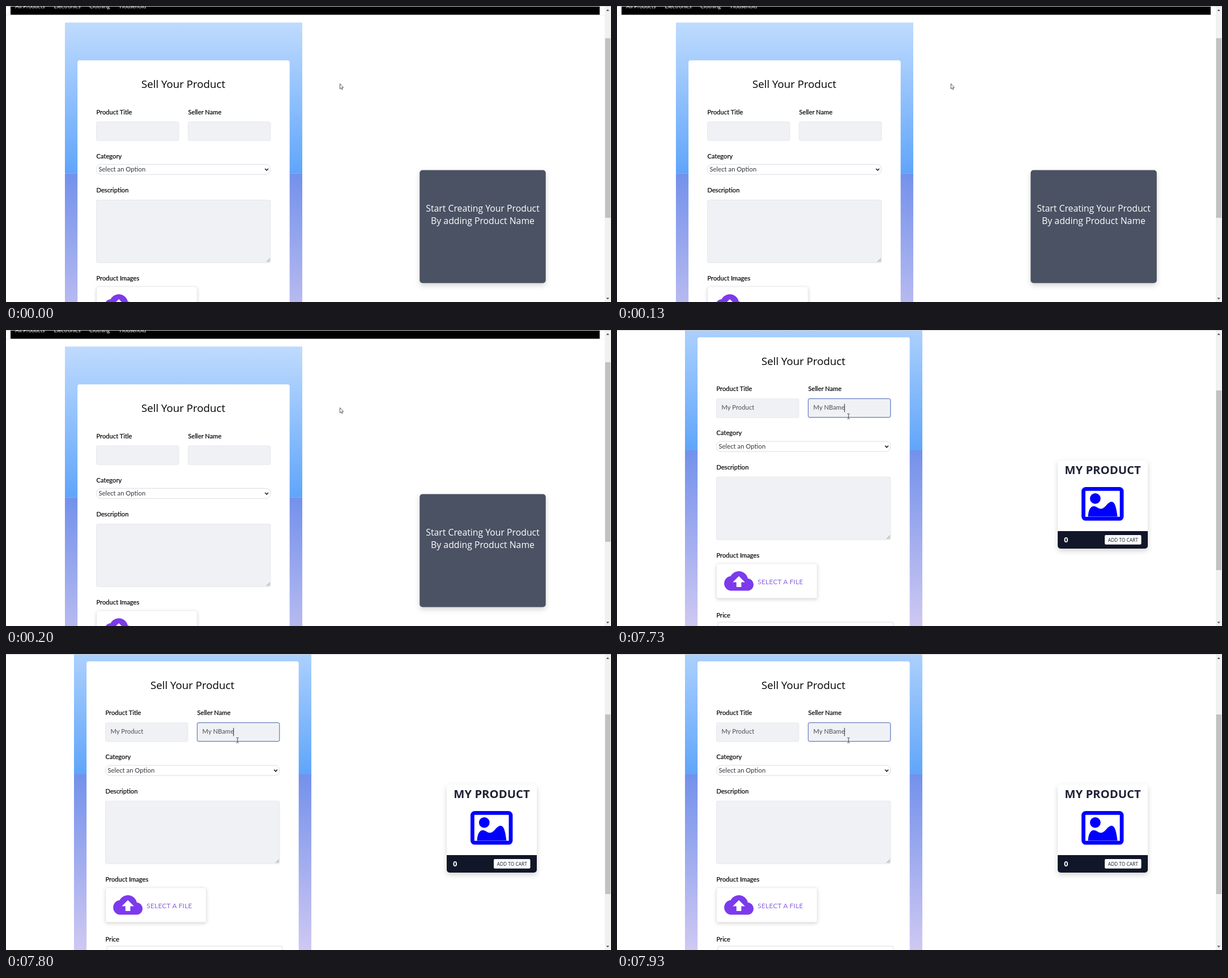
These frames come from a looping animation (1068 by 524 pixels, 8000 ms). An HTML page:

```html
<!DOCTYPE html>
<html lang="en">
<head>
<meta charset="utf-8">
<title>Sell form</title>
<style>
  html, body { margin: 0; width: 100%; height: 100%; overflow: hidden; background: #fff; }
  svg { display: block; width: 1068px; height: 524px; font-family: Lato, "Open Sans", sans-serif; }
  .ui { font-family: "Open Sans", "Noto Sans", sans-serif; }
  .label { font-size: 11.2px; stroke: #000; stroke-width: .2px; }
  .value { font-size: 11.3px; fill: #4d5058; }
  .field { fill: #f0f1f5; stroke: #e7e8ed; }
  .nav { font-size: 9.9px; fill: #fff; }
  .soft { filter: drop-shadow(0 2px 3px rgba(0, 0, 0, .16)); }
  .card { filter: drop-shadow(0 4px 5px rgba(0, 0, 0, .17)); }

  /* The page jumps from the empty form to the filled one at 7730 ms. */
  .before, .after, .form, .thumb { animation: 8s step-end infinite; }
  .before { animation-name: leave; }
  .after { animation-name: enter; }
  .form { animation-name: scroll; }
  .thumb { animation-name: slide; }
  @keyframes leave { 0% { visibility: visible; } 96.625%, 100% { visibility: hidden; } }
  @keyframes enter { 0% { visibility: hidden; } 96.625%, 100% { visibility: visible; } }
  @keyframes scroll { 0% { transform: none; } 96.625%, 100% { transform: translate(16px, -83.2px); } }
  @keyframes slide { 0% { transform: none; } 96.625%, 100% { transform: translateY(50px); } }
</style>
</head>
<body>
<svg viewBox="0 0 1068 524">
  <defs>
    <linearGradient id="sky" x2="0" y2="1">
      <stop stop-color="#bfdbfe"/><stop offset="1" stop-color="#60a5fa"/>
    </linearGradient>
    <linearGradient id="dusk" x2="0" y2="1">
      <stop stop-color="#7391eb"/><stop offset="1" stop-color="#d0c9f2"/>
    </linearGradient>
  </defs>

  <g class="form">
    <path fill="url(#sky)" d="M104 29.3h419v267h-419z"/>
    <path fill="url(#dusk)" d="M104 296.2h419v315h-419z"/>
    <rect x="126.2" y="96.2" width="374.5" height="540" rx="3.5" fill="#fff"/>
    <text class="ui" x="313" y="145.3" font-size="18.7" text-anchor="middle">Sell Your Product</text>

    <g class="label">
      <text x="159.5" y="191.7">Product Title</text>
      <text x="321.5" y="191.7">Seller Name</text>
      <text x="159.5" y="269.7">Category</text>
      <text x="159.5" y="330.2">Description</text>
      <text x="159.5" y="486">Product Images</text>
      <text x="159.5" y="592.7">Price</text>
    </g>

    <g class="field">
      <rect x="159.5" y="205" width="145.5" height="33.3" rx="2.5"/>
      <rect x="321.5" y="205" width="145.5" height="33.3" rx="2.5"/>
      <rect x="159.5" y="343.4" width="307.5" height="111" rx="2.5"/>
    </g>
    <path d="M460 453l6-6M463.3 453l2.7-2.7" stroke="#777" stroke-width=".9"/>

    <rect x="159.7" y="280.3" width="307" height="18" rx="8" fill="#fff" stroke="#d9dce3"/>
    <text x="163.5" y="293" class="value" style="fill:#33363c">Select an Option</text>
    <path d="M457.2 288l2.9 3 2.9-3" fill="none" stroke="#111" stroke-width="1.5"/>

    <rect class="soft" x="160" y="497" width="177.3" height="61" rx="3" fill="#fff" stroke="#e9e9ec" stroke-width=".7"/>
    <path transform="translate(173.2 501.6) scale(2.16)" fill="#7c3aed" d="M19.35 10.04C18.67 6.59 15.64 4 12 4 9.11 4 6.6 5.64 5.35 8.04 2.34 8.36 0 10.91 0 14c0 3.31 2.69 6 6 6h13c2.76 0 5-2.24 5-5 0-2.64-2.05-4.78-4.65-4.96zM14 13v4h-4v-4H7l5-5 5 5h-3z"/>
    <text x="232.3" y="533.6" font-size="11.8" letter-spacing=".3" fill="#8a5fe0">SELECT A FILE</text>
    <rect x="162" y="600.3" width="310" height="24" rx="3" fill="#fff" stroke="#d9dce3"/>

    <g class="after">
      <text class="value" x="168.5" y="224.7">My Product</text>
      <rect x="321.5" y="204.8" width="145.3" height="33" rx="2.5" fill="none" stroke="#4c68b8"/>
      <text class="value" x="330.6" y="224.7">My NBame</text>
      <path d="M385.7 214v14.5" stroke="#222"/>
    </g>
  </g>

  <g class="before">
    <path d="M0 16h8M1048 16h9" stroke="#eee"/>
    <path d="M8 0h1040v15.4H8z"/>
    <g class="nav">
      <text x="16.3" y="3.6">All Products</text>
      <text x="84.5" y="3.6">Electronics</text>
      <text x="147" y="3.6">Clothing</text>
      <text x="200.3" y="3.6">Household</text>
    </g>
    <rect class="card" x="730.2" y="290.5" width="222.6" height="200" rx="5" fill="#4a5263"/>
    <g class="ui" font-size="15.8" fill="#fff" text-anchor="middle">
      <text x="841.5" y="363.6">Start Creating Your Product</text>
      <text x="841.5" y="386">By adding Product Name</text>
    </g>
    <path d="M589.5 137.6v9.2l2-1.9 1.4 3 1.5-.7-1.4-2.9h2.6z" fill="#fff" stroke="#333" stroke-width=".8"/>
  </g>

  <g class="after">
    <g class="card">
      <rect x="778" y="231" width="159" height="155.7" rx="5" fill="#fff"/>
      <path d="M778 356h159v26a5 5 0 0 1-5 5H783a5 5 0 0 1-5-5z" fill="#111729"/>
    </g>
    <g class="ui">
      <text x="857.5" y="254.6" font-size="20.3" font-weight="700" fill="#1e2133" text-anchor="middle">MY PRODUCT</text>
      <text x="789" y="376.2" font-size="13" font-weight="700" fill="#fff">0</text>
      <rect x="861" y="363" width="64.5" height="16.8" rx="2" fill="#fff"/>
      <text x="893.3" y="374.5" font-size="8.4" fill="#111729" text-anchor="middle">ADD TO CART</text>
    </g>
    <g fill="#00f">
      <rect x="823.4" y="281.4" width="67.6" height="52.8" rx="4" fill="none" stroke="#00f" stroke-width="6.8"/>
      <circle cx="844.3" cy="298.4" r="9.4"/>
      <path d="M831.5 330.5C832 319 836 311.500 842 312C848 312.500 850 317 855 316.500C862 316 866 304 873 304C880 304 882 319 883.500 330.500z"/>
    </g>
    <path d="M406.500 148.300h1.500l.7.600.700-.600h1.500M408.700 149v7.500M406.500 157.100h1.500l.7-.600.700.600h1.500" fill="none" stroke="#333" stroke-width=".9"/>
  </g>

  <path d="M1057 0h11v524h-11z" fill="#f1f1f1"/>
  <path class="thumb" d="M1057.700 57h9.300v318h-9.300z" fill="#c1c1c1"/>
  <path d="M1059.500 8.800l2.700-3 2.700 3zM1059.500 516.500l2.700 3 2.700-3z" fill="#505050"/>
  <path d="M0 .5h1068" stroke="#cfcfcf"/>
</svg>
</body>
</html>
```
